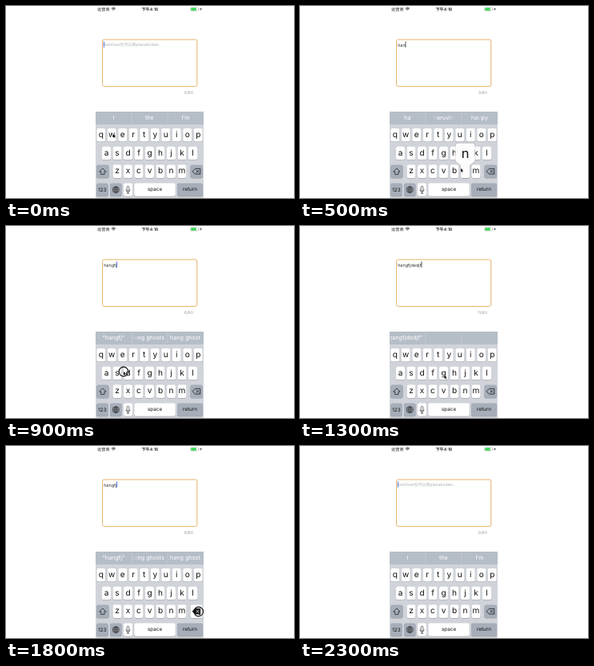
These frames come from a looping animation (360x240 px, 2400 ms). An HTML page with a canvas:

```html
<!DOCTYPE html>
<html lang="en">
<head>
<meta charset="utf-8">
<title>Text view with counter</title>
<style>
html, body { margin: 0; width: 100%; height: 100%; overflow: hidden; background: #fff; }
canvas { display: block; width: 360px; height: 240px; }
</style>
</head>
<body>
<canvas id="stage"></canvas>
<script>
const canvas = document.getElementById('stage');
const ctx = canvas.getContext('2d');
const dpr = window.devicePixelRatio || 1;
canvas.width = 360 * dpr;
canvas.height = 240 * dpr;
ctx.textRendering = 'geometricPrecision';

const UNIT = 135 / 320;   // phone points to stage pixels
const LEFT = 112;
const STEP = 100;
const FONT = 'Inter, "Noto Sans CJK SC", "Noto Sans CJK", sans-serif';
const ROWS = [['qwertyuiop', 3, 362.8], ['asdfghjkl', 19, 416.8], ['zxcvbnm', 51, 470.8]];
const LAST_ROW = 524.8;

// typed text, pointer x, pointer y, pressed key, click ring
const STEPS = [
  ['', 134, 160],
  ['', 168, 172],
  ['h', 191, 183, 'h'],
  ['ha', 126, 183, 'a'],
  ['ha', 166, 195],
  ['han', 201, 203, 'n'],
  ['hang', 180, 184, 'g'],
  ['hangf', 166, 184, 'f'],
  ['hangfj', 205, 184, 'j'],
  ['hangfj', 147, 182, '', true],
  ['hangfjd', 148, 182, 'd'],
  ['hangfjde', 146, 163, 'e'],
  ['hangfjdedj', 204, 184, 'j'],
  ['hangfjdedjf', 180.5, 186.5],
  ['hangfjdedjfg', 181, 185, 'g'],
  ['hangfjdedjfg', 220, 199],
  ['hangfjdedjf', 240.7, 207, 'del', true],
  ['hangfjded', 240.7, 207, 'del', true],
  ['hangfj', 240.7, 207, 'del', true],
  ['han', 240.7, 207, 'del', true],
  ['ha', 240.7, 207, '', true],
  ['h', 240.7, 207, 'del', true],
  ['', 240.7, 207, '', true],
  ['']
];
const DARK_CARET = [5, 6, 13, 14, 15, 16];

// "~" marks a letter that is still fading
const HINTS = {
  '': ['I', 'the', 'I’m'],
  h: ['“h”', 'have', 'he'],
  ha: ['“ha”', 'haruvin', 'happy'],
  han: ['~“ha~”', '~haruvi~n', 'ha~ppy'],
  hang: ['“hang”', 'hangs', 'hanging'],
  hangfj: ['“hangfj”', '~h~ang ghosts', 'hang ghost']
};

function hintsFor(text, index) {
  if (index >= 14 && index <= 17) return ['“hangfjdedjfg”', 'hang faded', 'hang faded'];
  return HINTS[text] || ['“' + text + '”', '', ''];
}

function label(str, x, y, size, color, align = 'center', weight = 400) {
  ctx.font = `${weight} ${size}px ${FONT}`;
  ctx.textAlign = align;
  ctx.fillStyle = color;
  ctx.fillText(str, x, y);
}

function box(x, y, w, h, r, color) {
  ctx.beginPath();
  ctx.roundRect(x, y, w, h, r);
  ctx.fillStyle = color;
  ctx.fill();
}

function poly(points) {
  ctx.beginPath();
  points.forEach(([x, y], i) => i ? ctx.lineTo(x, y) : ctx.moveTo(x, y));
  ctx.closePath();
}

function pen(color, width) {
  ctx.strokeStyle = color;
  ctx.lineWidth = width;
}

function arc(x, y, r, from = 0, to = Math.PI * 2) {
  ctx.beginPath();
  ctx.arc(x, y, r, from, to);
  ctx.stroke();
}

function statusBar() {
  label('运营商', 5, 14, 12.3, '#222', 'left');
  pen('#222', 2);
  for (const r of [2.5, 5.7, 9]) arc(53, 14, r, -Math.PI * .75, -Math.PI * .25);
  label('下午4:16', 161, 14, 12.3, '#222', 'center', 600);
  pen('#999', 1);
  ctx.beginPath();
  ctx.roundRect(281.5, 4.5, 23, 10, 2.5);
  ctx.stroke();
  box(282.5, 5.5, 16, 8, 1.5, '#3fd65a');
  box(305.5, 7.5, 1.7, 4, 1, '#999');
  poly([[313, 4], [309, 10], [312, 10], [310, 15], [315, 8.5], [312, 8.5]]);
  ctx.fillStyle = '#222';
  ctx.fill();
}

function textView(text, index) {
  pen('#e3ad5f', 2.2);
  ctx.beginPath();
  ctx.roundRect(20.2, 99.5, 280.4, 138.5, 5);
  ctx.stroke();
  if (text) label(text, 24, 119.8, 13, '#333', 'left');
  else label('textView也可以有placeholder...', 23, 118.5, 12, '#aaa', 'left');
  ctx.font = `400 13px ${FONT}`;
  const x = 24 + (text ? ctx.measureText(text).width : 0);
  box(x - .5, 105, 2.2, 18, 1, DARK_CARET.includes(index) ? '#444' : '#4460dd');
  label(text.length + '/80', 289, 260, 12, '#999', 'right');
}

function hint(str, cell) {
  const plain = str.replaceAll('~', '');
  const x0 = cell * 106.7;
  ctx.font = `400 17px ${FONT}`;
  const width = ctx.measureText(plain).width;
  let x = x0 + 53 - width / 2;
  if (width > 90) x = Math.min(x, x0 + 97 - width);
  ctx.save();
  ctx.beginPath();
  ctx.rect(x0 + 2, 313, 103, 39);
  ctx.clip();
  let faint = false;
  for (const ch of str) {
    if (ch === '~') { faint = true; continue; }
    label(ch, x, 337, 17, faint ? 'rgba(255,255,255,.35)' : '#fff', 'left');
    x += ctx.measureText(ch).width;
    faint = false;
  }
  ctx.restore();
}

function key(x, y, w, color) {
  box(x, y + 1.2, w, 39, 5, '#8f9297');
  box(x, y, w, 39, 5, color);
}

function shiftIcon() {
  pen('#222', 1.8);
  poly([[21, 481], [31, 491], [26, 491], [26, 499], [16, 499], [16, 491], [11, 491]]);
  ctx.stroke();
}

function deleteIcon(down) {
  pen('#111', 1.8);
  poly([[287, 490], [295, 482], [310, 482], [310, 498], [295, 498]]);
  if (down) {
    ctx.fillStyle = '#111';
    ctx.fill();
  }
  ctx.stroke();
  if (down) ctx.strokeStyle = '#fff';
  ctx.beginPath();
  ctx.moveTo(298, 486); ctx.lineTo(306, 494);
  ctx.moveTo(306, 486); ctx.lineTo(298, 494);
  ctx.stroke();
}

function globeIcon() {
  pen('#222', 1.4);
  arc(60, 544.3, 9.5);
  ctx.beginPath();
  ctx.ellipse(60, 544.3, 4.5, 9.5, 0, 0, Math.PI * 2);
  ctx.moveTo(60, 535); ctx.lineTo(60, 554);
  for (const [dy, w] of [[-5, 8], [0, 9.5], [5, 8]]) {
    ctx.moveTo(60 - w, 544.3 + dy);
    ctx.lineTo(60 + w, 544.3 + dy);
  }
  ctx.stroke();
}

function micIcon() {
  pen('#222', 1.5);
  ctx.beginPath();
  ctx.roundRect(92.8, 534, 6.4, 14, 3.2);
  ctx.stroke();
  arc(96, 544, 6.2, 0, Math.PI);
  ctx.beginPath();
  ctx.moveTo(96, 550); ctx.lineTo(96, 555);
  ctx.moveTo(92, 555); ctx.lineTo(100, 555);
  ctx.stroke();
}

function balloon(ch, cx, y) {
  const top = y - 64, neck = y - 15, foot = y + 6;
  ctx.beginPath();
  ctx.moveTo(cx - 13, y + 34);
  ctx.lineTo(cx - 13, foot);
  ctx.bezierCurveTo(cx - 13, foot - 11, cx - 29, neck + 10, cx - 29, neck);
  ctx.lineTo(cx - 29, top + 10);
  ctx.quadraticCurveTo(cx - 29, top, cx - 19, top);
  ctx.lineTo(cx + 19, top);
  ctx.quadraticCurveTo(cx + 29, top, cx + 29, top + 10);
  ctx.lineTo(cx + 29, neck);
  ctx.bezierCurveTo(cx + 29, neck + 10, cx + 13, foot - 11, cx + 13, foot);
  ctx.lineTo(cx + 13, y + 34);
  ctx.quadraticCurveTo(cx + 13, y + 39, cx + 8, y + 39);
  ctx.lineTo(cx - 8, y + 39);
  ctx.quadraticCurveTo(cx - 13, y + 39, cx - 13, y + 34);
  ctx.fillStyle = '#fcfcfc';
  ctx.save();
  ctx.shadowColor = 'rgba(0,0,0,.35)';
  ctx.shadowBlur = 1.5 * dpr;
  ctx.fill();
  ctx.restore();
  label(ch, cx, y - 20.5, 39, '#111');
}

function keyboard(text, index, pressed) {
  ctx.fillStyle = '#d0d4da';
  ctx.fillRect(0, 313, 320, 256);
  ctx.fillStyle = '#b5bdc6';
  ctx.fillRect(0, 313, 320, 38);
  ctx.fillStyle = '#cbd0d7';
  for (const x of [106, 212.7]) ctx.fillRect(x, 316, 1.6, 32);
  hintsFor(text, index).forEach(hint);

  let popup = null;
  for (const [letters, x0, y] of ROWS) {
    [...letters].forEach((ch, i) => {
      const x = x0 + i * 32;
      key(x, y, 26, '#fff');
      label(ch, x + 13, y + 25.7, 24, '#111');
      if (ch === pressed) popup = [ch, x + 13, y];
    });
  }
  const grey = '#a6aeb9', down = pressed === 'del', shiftRow = ROWS[2][2];
  key(3, shiftRow, 36, grey);
  key(281, shiftRow, 36, down ? '#fff' : grey);
  key(3, LAST_ROW, 34, grey);
  key(43, LAST_ROW, 34, grey);
  key(83, LAST_ROW, 26, '#fff');
  key(114.4, LAST_ROW, 122.2, '#fff');
  key(242, LAST_ROW, 75, grey);
  shiftIcon();
  deleteIcon(down);
  globeIcon();
  micIcon();
  label('123', 20, LAST_ROW + 24, 15, '#111');
  label('space', 175.5, LAST_ROW + 23, 15, '#111');
  label('return', 279.5, LAST_ROW + 23, 15, '#111');
  if (popup) balloon(...popup);
}

function pointer(x, y, ring) {
  if (ring) {
    pen('#111', 1.2);
    arc(x, y, 5.8);
  }
  poly([[0, 0], [0, 5.4], [1.3, 4.3], [2.2, 6.3], [3.1, 5.9], [2.2, 4], [3.9, 3.9]]
    .map(([px, py]) => [x + px * .8, y + py * .8]));
  pen('rgba(255,255,255,.8)', .6);
  ctx.stroke();
  ctx.fillStyle = '#000';
  ctx.fill();
}

function draw(time) {
  const index = Math.floor(time / STEP) % STEPS.length;
  const [text, x, y, pressed, ring] = STEPS[index];
  ctx.setTransform(dpr, 0, 0, dpr, 0, 0);
  ctx.fillStyle = '#fff';
  ctx.fillRect(0, 0, 360, 240);
  ctx.save();
  ctx.translate(LEFT, 0);
  ctx.scale(UNIT, UNIT);
  statusBar();
  textView(text, index);
  keyboard(text, index, pressed);
  ctx.restore();
  if (x !== undefined) pointer(x, y, ring);
}

const start = performance.now();
function tick() {
  draw(performance.now() - start);
  requestAnimationFrame(tick);
}
tick();
</script>
</body>
</html>
```
